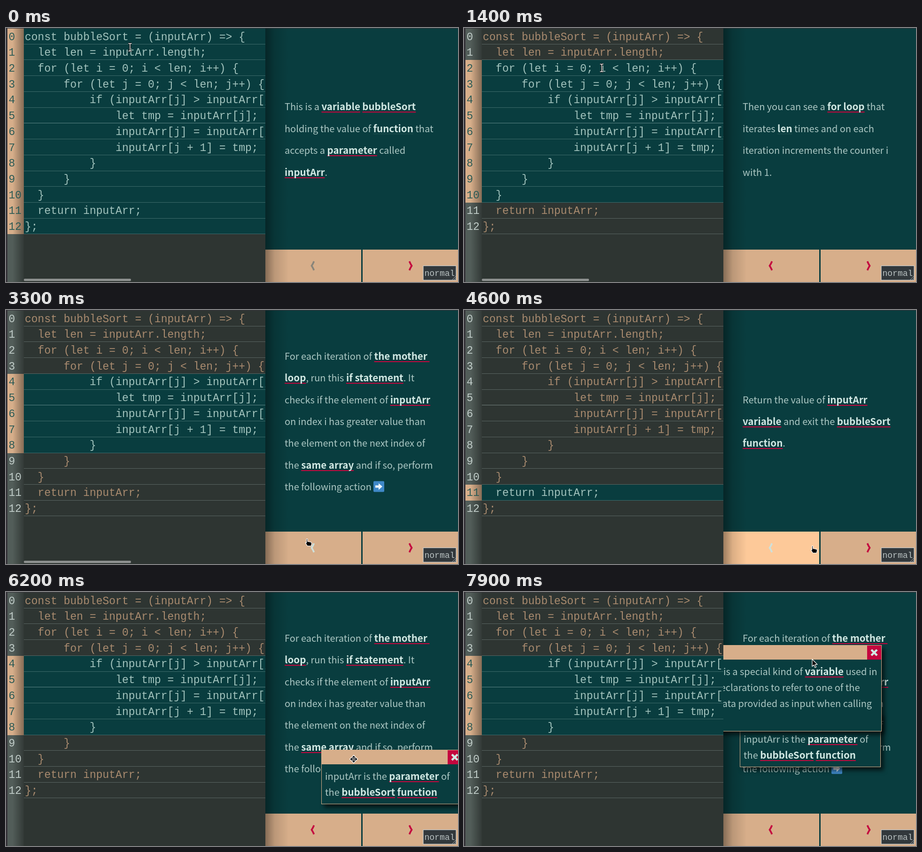
These frames come from a looping animation (962 by 541 pixels, 8000 ms). An HTML page:

```html
<!DOCTYPE html>
<html lang="en">
<head>
<meta charset="utf-8">
<title>Bubble sort walkthrough</title>
<style>
  html, body { margin: 0; width: 100%; height: 100%; overflow: hidden; background: #2e3532; }
  svg { display: block; width: 962px; height: 541px; }
  text { white-space: pre; }
</style>
</head>
<body>
<svg id="stage" viewBox="0 0 962 541" xmlns="http://www.w3.org/2000/svg">
  <defs>
    <linearGradient id="edgeIn"><stop offset="0" stop-opacity="0"/><stop offset="1" stop-opacity=".38"/></linearGradient>
    <linearGradient id="edgeOut"><stop offset="0" stop-opacity=".38"/><stop offset=".4" stop-opacity=".13"/><stop offset="1" stop-opacity="0"/></linearGradient>
    <clipPath id="codeClip"><rect x="38" y="0" width="514" height="541"/></clipPath>
    <clipPath id="sideClip"><rect x="552" y="0" width="410" height="541"/></clipPath>
  </defs>
</svg>
<script>
const LOOP = 8000;
const TEAL = '#093d3f', SLATE = '#2e3532', PEACH = '#d7ae8a', RED = '#c4063e', MINT = '#d2e9e4', SOFT = '#adc9c5';
const SANS = '"Noto Sans CJK JP", "Noto Sans CJK SC", Lato, sans-serif';
const MONO = '"Liberation Mono", "Noto Sans Mono", monospace';
const PITCH = 13.8;

const stage = document.getElementById('stage');
const ctx = document.createElement('canvas').getContext('2d');

function add(parent, tag, attrs = {}, content) {
  const node = document.createElementNS('http://www.w3.org/2000/svg', tag);
  for (const key in attrs) node.setAttribute(key, attrs[key]);
  if (content !== undefined) node.textContent = content;
  parent.appendChild(node);
  return node;
}
const group = (parent, attrs) => add(parent, 'g', attrs);
const rect = (parent, x, y, width, height, fill, more) => add(parent, 'rect', { x, y, width, height, fill, ...more });
const path = (parent, d, attrs) => add(parent, 'path', { d, fill: 'none', ...attrs });
const show = (node, on) => node.setAttribute('visibility', on ? 'inherit' : 'hidden');
const moveTo = (node, [x, y]) => node.setAttribute('transform', `translate(${x.toFixed(2)} ${y.toFixed(2)})`);

function measure(text, weight, size, family) {
  ctx.font = `${weight} ${size}px ${family}`;
  return ctx.measureText(text).width;
}
// Font size at which a sample runs to a given length
const sizeFor = (sample, length, weight, family) => 100 * length / measure(sample, weight, 100, family);
const monoSize = sizeFor('m', PITCH, 300, MONO);
const light = { weight: 300, size: sizeFor('the following action', 185, 300, SANS), fill: SOFT };
const bold = { weight: 700, size: sizeFor('bubbleSort', 114, 700, SANS), fill: MINT };
const lightWidth = text => measure(text, light.weight, light.size, SANS);

function mono(parent, x, y, text, fill, size = monoSize) {
  return add(parent, 'text', { x, y, fill, 'font-family': MONO, 'font-weight': 300, 'font-size': size }, text);
}

// *word* is a link, _word_ a faintly underlined term
function richLine(parent, x, y, source) {
  for (const part of source.split(/(\*[^*]+\*|_[^_]+_)/)) {
    if (!part) continue;
    const mark = '*_'.includes(part[0]) ? part[0] : '';
    const text = mark ? part.slice(1, -1) : part;
    const style = mark ? bold : light;
    const width = measure(text, style.weight, style.size, SANS);
    if (mark) rect(parent, x, y + 3, width, mark === '*' ? 2 : 1, mark === '*' ? RED : '#255453');
    add(parent, 'text', { x, y, fill: style.fill, 'font-family': SANS, 'font-weight': style.weight, 'font-size': style.size }, text);
    x += width;
  }
}

const code = `const bubbleSort = (inputArr) => {
  let len = inputArr.length;
  for (let i = 0; i < len; i++) {
      for (let j = 0; j < len; j++) {
          if (inputArr[j] > inputArr[j + 1]) {
              let tmp = inputArr[j];
              inputArr[j] = inputArr[j + 1];
              inputArr[j + 1] = tmp;
          }
      }
  }
  return inputArr;
};`.split('\n');

const steps = [
  { rows: [0, 12], lines: ['This is a *variable* *bubbleSort*', 'holding the value of _function_ that', 'accepts a *parameter* called', '*inputArr*.'] },
  { rows: [1, 1], lines: ['Declare a *variable* _len_ holding', 'the length of *inputArr*.'] },
  { rows: [2, 10], lines: ['Then you can see a *for loop* that', 'iterates _len_ times and on each', 'iteration increments the counter i', 'with 1.'] },
  { rows: [3, 9], lines: ['For each iteration of that loop', 'run another *for loop* that', 'iterates _len_ times and', 'increments the counter j with 1.'] },
  { rows: [4, 8], lines: ['For each iteration of *the mother *', '*loop*, run this *if statement*. It', 'checks if the element of *inputArr*', 'on index i has greater value than', 'the element on the next index of', 'the *same array* and if so, perform', 'the following action'] },
  { rows: [5, 7], lines: ['Swap the two elements with the', 'help of a *variable* called _tmp_.'] },
  { rows: [11, 11], lines: ['Return the value of *inputArr*', '*variable* and exit the *bubbleSort*', '*function*.'] }
];

// Code panel
const rowTop = k => k ? Math.round(33.73 * k) + 1 : 1;
rect(stage, 0, 0, 962, 541, SLATE);
rect(stage, 3, 1, 35, 540, '#525d59');
const codePanel = group(stage, { 'clip-path': 'url(#codeClip)' });
const rows = code.map((line, k) => {
  const top = rowTop(k), height = rowTop(k + 1) - top, base = Math.round(25.6 + 33.7 * k);
  const indent = line.search(/\S/);
  const gutter = rect(stage, 3, top, 35, height, PEACH);
  const back = rect(codePanel, 38, top, 514, height, TEAL);
  rect(codePanel, 38, top + height - 1, 514, 1, '#d8eeea', { 'fill-opacity': k === 5 ? .4 : .25 });
  return { gutter, back, text: mono(codePanel, 40 + indent * PITCH, base, line.trim(), SOFT), base };
});
rect(stage, 14, 1, 24, 540, 'url(#edgeIn)');
rows.forEach((row, k) => { row.number = mono(stage, 5.5, row.base, k, TEAL); });
const scrollbar = rect(stage, 38, 534, 228, 5, '#8d908f', { rx: 2 });
rect(stage, 0, 0, 3, 541, '#343238');
rect(stage, 0, 0, 962, 1, '#343238');

// Explanation panel
const side = group(stage, { 'clip-path': 'url(#sideClip)' });
rect(side, 552, 1, 410, 540, TEAL);
const slides = steps.map(({ lines }) => {
  const slide = group(side);
  lines.forEach((line, k) => richLine(slide, 593, Math.round(245 + (k - (lines.length - 1) / 2) * 46.4), line));
  return slide;
});
rect(slides[4], 782, 364.5, 23, 23, '#3f88c7', { rx: 2 });
path(slides[4], 'M786 373.5H793V369L801 376L793 383V378.5H786Z', { fill: '#eef6fb' });

function button(x, width, tip, direction) {
  const back = rect(side, x, 472, width, 69, PEACH);
  const arrow = path(side, `M${tip - 3 * direction} 497Q${tip - direction} 502 ${tip + 2 * direction} 506.5Q${tip - direction} 511 ${tip - 3 * direction} 516`,
    { 'stroke-width': 3.6 });
  return { back, arrow };
}
const prev = button(552, 204, 652.5, -1);
const next = button(759, 203, 861.5, 1);
rect(side, 552, 1, 50, 540, 'url(#edgeOut)');

function popup(width, lines, textX) {
  const height = 48 + 34 * lines.length;
  const node = group(side, { style: 'filter: drop-shadow(6px 7px 5px rgba(0,0,0,.65))' });
  rect(node, .5, .5, width - 1, height - 1, TEAL, { stroke: PEACH });
  rect(node, 0, 0, width, 31, PEACH);
  rect(node, width - 31, 1, 30, 30, RED);
  path(node, `M${width - 22} 10l12 12m0 -12l-12 12`, { stroke: MINT, 'stroke-width': 4.5 });
  lines.forEach((line, k) => richLine(node, textX, 64 + 34 * k, line));
  return node;
}
const usage = popup(300, ['inputArr is the *parameter* of', 'the *bubbleSort* *function*'], 8);
const definition = popup(460, [
  'Parameter is a special kind of *variable* used in',
  'function declarations to refer to one of the',
  'pieces of data provided as input when calling',
  'a function.'
], 123 - lightWidth('Parameter '));

// Mode badge
rect(stage, 888, 506.5, 70, 30.5, '#32383c', { stroke: '#c9cdcd', 'stroke-width': 1.2 });
mono(stage, 890.5, 528, 'normal', '#b9c1c1', monoSize * 18 / 23);
path(stage, 'M949 537l9 -9m-5 9l5 -5', { stroke: '#a9afb0' });

// Pointers
const outline = { stroke: '#fff', 'stroke-width': 1.2, 'stroke-linejoin': 'round' };
const pointers = { beam: group(stage), hand: group(stage), move: group(stage), arrow: group(stage) };
const beamShape = 'M-3.5 -8H-1L0 -7L1 -8H3.5M-3.5 8H-1L0 7L1 8H3.5M0 -7V7';
path(pointers.beam, beamShape, { stroke: '#000', 'stroke-width': 3.6 });
path(pointers.beam, beamShape, { stroke: '#fff', 'stroke-width': 1.4 });
path(pointers.hand, 'M-4.5 -7.5H-2.2V-2L5 -.5Q7 0 6.6 3L5.5 7.5H-2.5L-6.5 1.5Q-6.5 -.5 -4.5 1Z', { ...outline, fill: '#000' });
path(pointers.move, 'M0 -8.5L3.5 -4.5L8.5 0L3.5 4.5L0 8.5L-3.5 4.5L-8.5 0L-3.5 -4.5Z', { ...outline, fill: '#000' });
rect(pointers.move, -3, -3, 6, 6, 'none', { stroke: '#fff' });
add(pointers.move, 'circle', { r: 1.3, fill: '#fff' });
path(pointers.arrow, 'M0 0V15.5L3.7 12.3L6 18L8.6 17L6.2 11.3H11Z', { ...outline, fill: '#000' });

// Timelines: [time, value...]
const stepTimes = [[0, 0], [1000, 1], [1250, 2], [1650, 3], [2050, 4], [3450, 3], [3900, 4], [4100, 5], [4350, 6], [4750, 5], [5000, 4]];
const pointerKinds = [[0, 'beam'], [2850, 'arrow'], [3200, 'hand'], [5050, 'arrow'], [5350, 'hand'], [5700, 'move'], [7000, 'hand'], [7500, 'move'], [7850, 'arrow']];
const pointerPath = [
  [0, 264, 41], [300, 270, 12], [600, 282, 30], [950, 287, 49], [1400, 293, 85], [1700, 300, 118], [2100, 306, 152],
  [2600, 400, 250], [2850, 552, 400], [3300, 644, 495], [3450, 650, 505], [3650, 660, 506], [3820, 815, 508],
  [4450, 820, 509], [4600, 745, 510], [4750, 680, 508], [5000, 670, 506], [5400, 705, 332], [5600, 706, 332], [5720, 740, 325],
  [5900, 745, 256], [6200, 740, 356], [6400, 722, 415], [6650, 735, 132], [6850, 655, 195], [6980, 629, 271],
  [7100, 750, 311], [7400, 752, 314], [7550, 722, 198], [7900, 741, 143]
];
const usagePath = [[5600, 671, 305], [5720, 671, 305], [5900, 676, 236], [6200, 671, 336], [6400, 653, 395], [6650, 666, 112],
  [6850, 586, 175], [6980, 560, 251], [7120, 560, 251], [7200, 587, 257]];
const definitionPath = [[7400, 410, 167], [7550, 410, 167], [7900, 429, 113]];

const latest = (track, t) => track.filter(key => key[0] <= t).pop()[1];

function along(track, t) {
  const i = track.findIndex(key => key[0] > t);
  if (i < 0) return track[track.length - 1].slice(1);
  if (i === 0) return track[0].slice(1);
  const [t0, x0, y0] = track[i - 1], [t1, x1, y1] = track[i];
  const p = (t - t0) / (t1 - t0), e = p * p * (3 - 2 * p);
  return [x0 + (x1 - x0) * e, y0 + (y1 - y0) * e];
}

function paintButton({ back, arrow }, bright, hovered, disabled) {
  back.setAttribute('fill', bright ? '#fdc999' : PEACH);
  arrow.setAttribute('stroke', disabled ? '#89857a' : hovered ? '#cfe0da' : RED);
}

function render(t) {
  const current = latest(stepTimes, t);
  const [from, to] = steps[current].rows;
  slides.forEach((slide, k) => show(slide, k === current));
  rows.forEach((row, k) => {
    const active = k >= from && k <= to;
    show(row.gutter, active);
    show(row.back, active);
    row.text.setAttribute('fill', active ? '#a3c4be' : '#a98b6f');
    row.number.setAttribute('fill', active ? '#2b5a55' : '#c0ccc8');
  });
  show(scrollbar, t < 3800);

  const at = along(pointerPath, t);
  const overPrev = at[1] > 472 && at[0] > 552 && at[0] < 757;
  const overNext = at[1] > 472 && at[0] > 759;
  paintButton(prev, overPrev && t > 3350, overPrev, current === 0);
  paintButton(next, overNext, overNext, false);

  show(usage, t >= 5600);
  moveTo(usage, along(usagePath, t));
  show(definition, t >= 7400);
  moveTo(definition, along(definitionPath, t));

  const kind = latest(pointerKinds, t);
  for (const name in pointers) {
    show(pointers[name], name === kind);
    moveTo(pointers[name], at);
  }
}

const start = performance.now();
function tick() {
  render((performance.now() - start) % LOOP);
  requestAnimationFrame(tick);
}
render(0);
requestAnimationFrame(tick);
</script>
</body>
</html>
```
